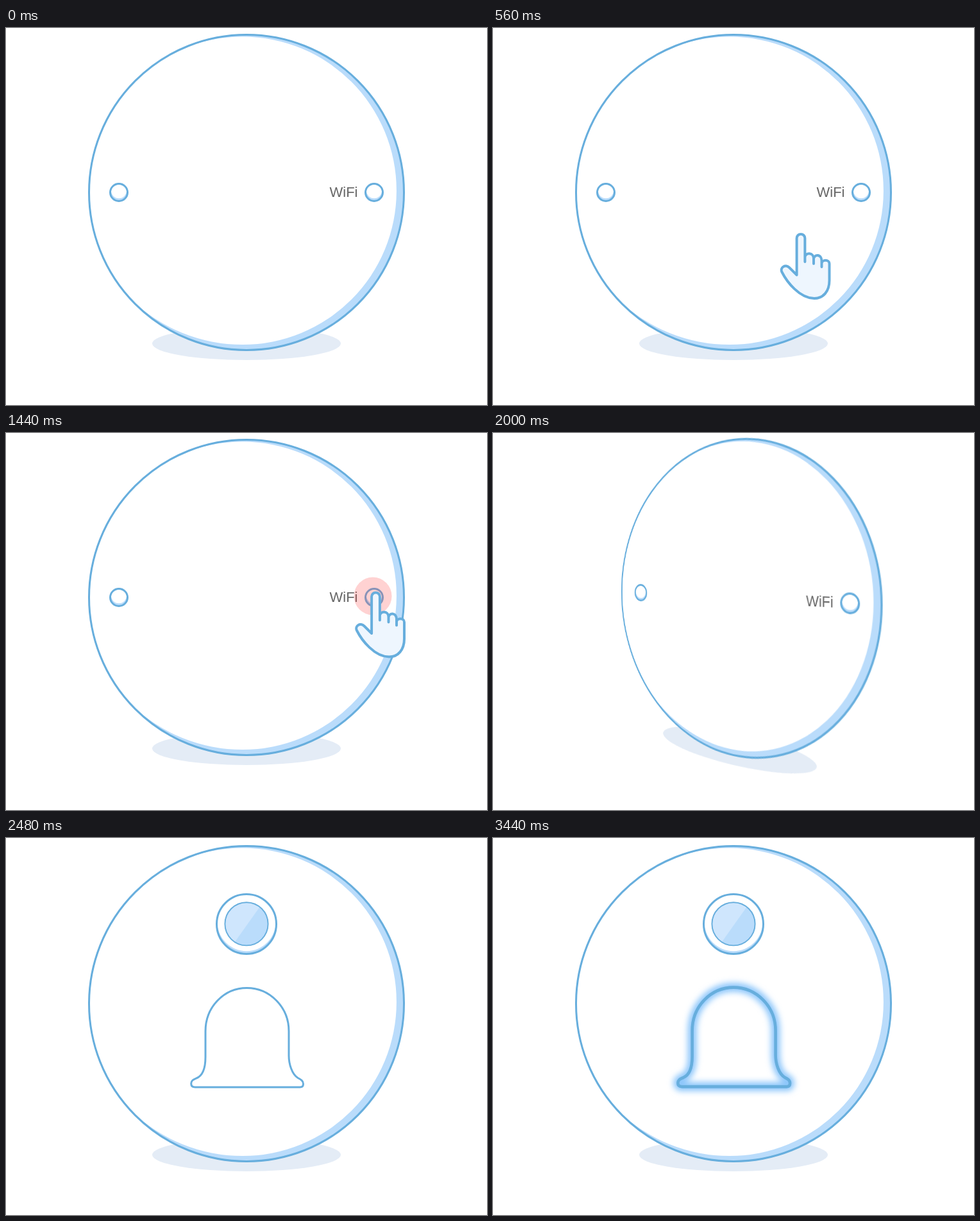
These frames come from a looping animation (750 by 587 pixels, 5480 ms). An HTML page:

```html
<!DOCTYPE html>
<html lang="en">
<head>
<meta charset="utf-8">
<title>Device setup</title>
<style>
  html, body { margin: 0; width: 100%; height: 100%; overflow: hidden; background: #fff; }
  #stage { position: fixed; inset: 0; overflow: hidden; contain: strict; }
  svg { position: absolute; left: 0; top: 0; width: 750px; height: 587px; }
  #front { transform-origin: 375px 256px; }
  #back { transform-origin: 375px 258px; }
  .line { fill: none; stroke: #67aedd; stroke-width: 3; stroke-linejoin: round; stroke-linecap: round; }
  .tint { fill: #badcfb; }
  .white { fill: #fff; }
  text { font: 22px "Liberation Sans", Arial, sans-serif; fill: #666; }
</style>
</head>
<body>
<div id="stage">
<!-- Shared shapes stay outside the sides, which are hidden in turn. -->
<svg viewBox="0 0 750 587">
  <defs>
    <clipPath id="discClip"><circle cx="375" cy="256" r="245"/></clipPath>
    <clipPath id="lensClip"><circle cx="375" cy="133.8" r="33.5"/></clipPath>
    <filter id="blur" filterUnits="userSpaceOnUse" x="250" y="195" width="250" height="230">
      <feGaussianBlur stdDeviation="4.6"/>
    </filter>
    <g id="disc">
      <ellipse cx="375" cy="491.3" rx="147" ry="25.7" fill="#e4ecf6"/>
      <circle class="tint" cx="375" cy="256" r="245"/>
      <path class="white" clip-path="url(#discClip)"
        d="M369 13.6A240 239.7 0 0 1 369 493A246 239.7 0 0 1 369 13.6Z"/>
      <circle class="line" cx="375" cy="256" r="245.5"/>
    </g>
    <g id="button">
      <circle class="tint" r="13.5"/>
      <circle class="white" cy="-3" r="12.2"/>
      <circle class="line" r="13.5"/>
    </g>
    <path id="bell" d="M311 301C311 263 340 233.5 375.5 233.5S441 263 441 301V339
      C441 352 446 368 455 373.5C460 376 463.5 378 463.5 383C463.5 386 462 388 458.5 388
      H295C291 388 288.7 386 288.7 382.5C288.7 377 293 376 297 374C307 370 311 357 311 341Z"/>
  </defs>
</svg>

<svg id="front" viewBox="0 0 750 587">
  <use href="#disc"/>
  <use href="#button" x="176" y="256"/>
  <text x="504.5" y="263">WiFi</text>
  <use href="#button" x="574" y="256"/>
</svg>

<svg id="back" viewBox="0 0 750 587">
  <use href="#disc" y="2"/>
  <circle class="tint" cx="375" cy="134" r="46.5"/>
  <circle class="white" cx="375" cy="130.6" r="45.6"/>
  <circle class="line" cx="375" cy="134" r="46.5"/>
  <g clip-path="url(#lensClip)">
    <rect class="tint" x="340" y="98" width="70" height="72"/>
    <path d="M403 97L351 170H330V97Z" fill="#cfe6fd"/>
  </g>
  <circle class="line" cx="375" cy="133.8" r="33.6" style="stroke-width:1.9"/>
  <use href="#bell" class="line"/>
  <g id="glow" transform="translate(-.4 -.9)">
    <use href="#bell" class="line" filter="url(#blur)" style="stroke:#8cc6fb;stroke-width:14"/>
    <use href="#bell" class="line" style="stroke-width:4.6"/>
  </g>
</svg>

<svg viewBox="0 0 750 587">
  <circle id="pulse" cx="572" cy="254" fill="#ff3232"/>
  <path id="hand" class="line" style="fill:#eef6fe;stroke-width:4"
    d="M473.6 384.5V327.3a6.4 6.4 0 0 1 12.8 0V364V357C486.6 349 500 349 500 359V367V360
    C500 352 512.5 351 512.5 363V372V367C512.5 360 524.5 360 524.5 367V393
    C524.5 410 515 421 501 421C478 421 458 395 450.5 380C447 373 456 367 462 373Z"/>
</svg>
</div>

<script>
const LOOP = 5480, STEP = 80, DEPTH = 1030, TILT = 0.07;
const [front, back, pulse, hand, glow] =
  ['front', 'back', 'pulse', 'hand', 'glow'].map(id => document.getElementById(id));
const clamp = v => Math.max(0, Math.min(1, v));
const show = (el, on) => { el.style.display = on ? 'inline' : 'none'; };

// Turn around the vertical axis in perspective, with a slight downward tilt.
function turn(el, degrees) {
  const a = degrees * Math.PI / 180, s = Math.sin(a);
  el.style.transform = degrees
    ? `matrix3d(${[Math.cos(a), TILT * s, 0, -s / DEPTH, 0, 1, 0, 0, 0, 0, 1, 0, 0, 0, 0, 1]})`
    : 'none';
}

function drawHand(n) {
  show(hand, n >= 1 && n < 22);
  const enter = Math.min(0, n - 7), reach = clamp((n - 7) / 7);
  const x = enter * 17.5 + reach * 96.5, y = enter * -12.8 - reach * 72.5;
  hand.setAttribute('transform', `translate(${x} ${y})`);
  hand.style.opacity = clamp(n / 7);
}

function drawPulse(n) {
  show(pulse, n >= 14 && n < 21);
  pulse.setAttribute('r', Math.min(29.5, 27.5 + (n - 14) * 0.5));
  pulse.style.opacity = 0.22 * clamp(Math.min((n - 13) / 4, (21 - n) / 3));
}

function draw(ms) {
  const n = Math.floor(ms / STEP);
  show(front, n < 27);
  show(back, n >= 29);
  turn(front, 36 * Math.max(0, Math.min(n, 26) - 24));
  turn(back, -20 * Math.max(0, 31 - Math.max(n, 29)));
  drawHand(n);
  drawPulse(n);
  glow.style.opacity = clamp((n - 37) / 6);
}

const start = performance.now();
function tick() {
  draw((performance.now() - start) % LOOP);
  requestAnimationFrame(tick);
}
tick();
</script>
</body>
</html>
```
